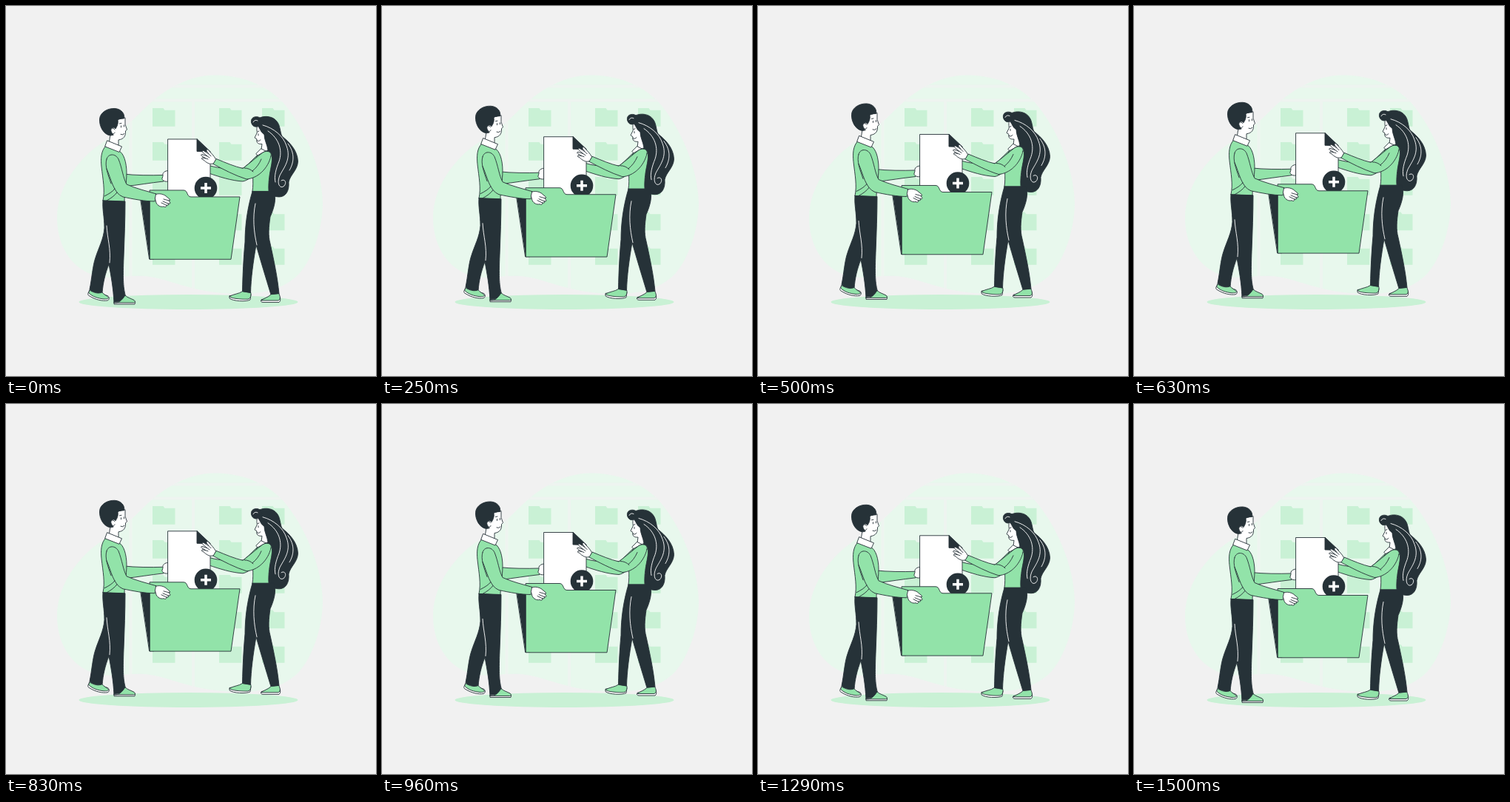
An HTML page that plays this animation: 500 by 500 pixels, repeating every 1.54 s.

```html
<!DOCTYPE html>
<html lang="en">
<head>
<meta charset="utf-8">
<title>Adding a file</title>
<style>
  html, body { margin: 0; width: 100%; height: 100%; overflow: hidden; background: #f1f1f1; }
  svg { display: block; width: 100%; height: 100%; }
  #team path { stroke: #263238; stroke-width: .9; stroke-linejoin: round; stroke-linecap: round; fill: none; }
  #team .green { fill: #92e3a9; }
  #team .dark { fill: #263238; }
  #team .white { fill: #fff; }
  #team .light { stroke: #fff; }
</style>
</head>
<body>
<svg viewBox="0 0 500 500">
  <defs>
    <path id="blob" d="M280 93.500C250 94 222 109 201 126C180 144 164 164 140 179C105 197 69 240 69 286C69 330 94 360 128 366C152 369 173 361 201 367C236 375 254 386 302 388.500C339 391 374 385 396 362C415 341 428 300 428 266C427 217 402 162 374 130C348 103 312 93 280 93.500Z"/>
    <clipPath id="inside"><use href="#blob"/></clipPath>
  </defs>

  <use href="#blob" fill="#e8f8ed"/>
  <g clip-path="url(#inside)">
    <path d="M215 108.500H360M190 127.500H385M168.500 130V375M253 129V395" fill="none" stroke="#eef4f0" stroke-width="4"/>
    <g id="shelf" fill="#c9f1d5"/>
  </g>
  <ellipse cx="246.500" cy="400" rx="148" ry="10" fill="#c9f1d5"/>

  <g id="team">
    <!-- far arms -->
    <path class="green" d="M158 227C175 229 195 229 213 228.500L213 237C195 239 178 242 160 244Z"/>
    <path class="white" d="M212 229C211 225 215 223 219 222.500V237C215 238 212 236 211 234Z"/>
    <path class="green" d="M276 216C290 220 306 221 321 219C329 213 336 204 343 199L340 222C333 231 326 236 320 237C304 236 289 231 274 226Z"/>

    <!-- folder and sheet -->
    <path class="dark" d="M182 261H200V342H194Z"/>
    <path class="white" d="M219 180H258L276 197V260H219Z"/>
    <path class="dark" d="M258 180V196.500L276 197Z"/>
    <circle cx="270" cy="246" r="15.300" fill="#263238"/>
    <path class="light" d="M263 246H277M270 239V253" style="stroke-width:3.500;stroke-linecap:butt"/>
    <path class="green" d="M194.500 249H240C246 249 244 258 250 258H316L304 342.300H194.500Z"/>

    <!-- man -->
    <path class="white" d="M142 168L139 186L152 192L152 181C159 180 162 176 161.500 169L163.500 167L161 160V151L147 154Z"/>
    <path class="dark" d="M141 175C132 174 126 163 126.500 153C127 144 137 138 147 138.500C156 139 161 146 159.500 152C155 152 152 153 151 154C152 159 150 163 148 166C146 163 142 164 142 168C142 171 144 173 145 174Z"/>
    <path class="white" d="M147 167C144 163 141 166 142 169C143 173 146 174 147 171"/>
    <path d="M153.500 159L156 158.500M155.500 162V164M155 173.500Q158 175 160 172.500M159.500 161V163"/>
    <path class="green" d="M135 189C128 196 128 207 129 217C131 235 134 249 131 263L160 264.500C160 255 163 238 163 226C163 211 159 199 153 196Z"/>
    <path class="white" d="M137 182L156.500 190L153 197.500L134 190Z"/>
    <path class="dark" d="M131 263L161 264C161 288 160 313 159 340C158 366 158 379 161.500 392C157 399 152 402 146 401C145 381 142 365 139 349C134 362 131 374 130 388C124 389 117 387 113 383C116 369 117 351 121 340C125 327 132 315 133 300C133 285 130 275 131 263Z"/>
    <path class="light" d="M136 297C137 315 142 328 140 347"/>
    <path class="white" d="M113 385C110 388 110 391 113 392C121 397 130 399 137 398C140 397 140 394 138 392Z"/>
    <path class="green" d="M113 384C119 388 125 389 130 387C132 390 136 391 138.500 394C139 396 135 396 132 396C124 395 117 393 112 388Z"/>
    <path class="white" d="M146 400V403H174Q176 400 173 398Z"/>
    <path class="green" d="M146 401C153 402 157 397 161 391C164 394 168 395 172 397C175 398 175 401 173 401Z"/>
    <path class="green" d="M136 207C138 199 148 199 152 207C157 219 158 232 163 241C176 247 190 250 203 254L201 264C188 264 172 261 158 258C145 253 142 233 136 220"/>
    <path d="M136 207C133 216 138 228 142 240M133 257C139 254 144 251 147 247M136 263C142 260 147 256 150 252"/>
    <path class="white" d="M202.500 254.500C207 253 211 254 215 256L221 261Q223 263 220 263L222 266Q222 268 219 267Q221 270 217 269Q217 273 213 271C209 272 205 270 203 266Q200 260 202.500 254.500Z"/>
    <path d="M213 261L220 263M212 264L219 267M210 266L217 269.500"/>

    <!-- woman -->
    <path class="dark" d="M340 163C333 165 330 157 332 153C334 149 340 149 343 151C350 148 361 149 366 156C371 162 370 170 373 176C383 184 394 195 394.500 210C394 222 384 228 382 238C383 250 378 258 369 258C358 258 353 250 355 241C358 226 354 208 351 197L343 166Z"/>
    <path class="white" d="M341 162C337 164 340 169 339 172L336 178L339 180C338 185 341 187 346 186.500L345 194L341 200L354 195C353 187 349 181 349 174C347 172 348 167 346 163Z"/>
    <path class="dark" d="M341 163C344 167 345 172 349 173C353 169 351 158 343 153C338 149 332 152 332 157C333 161 337 162 339 160Z"/>
    <path class="light" d="M334 157Q336 153 340 155M347 161C362 165 375 176 379 189C386 207 375 219 370 229C365 241 371 248 376 243C380 238 376 233 372 236M354 169C369 179 374 195 369 210C365 220 362 230 364 238M381 186C391 199 389 212 383 222"/>
    <path d="M340 170L342 169M341 173V175M339 182Q342 184 344 181"/>
    <path class="green" d="M341 200C350 195 359 196 359.500 204C360 217 354 227 355 250.500H333C335 237 332 226 335 211Z"/>
    <path class="white" d="M345 193L351 196L340 202L338 200Z"/>
    <path class="dark" d="M333 250.500H362C366 260 362 274 357 285C355 299 354 310 357 321C362 344 367 367 369 389L358 390C351 367 344 344 338 323C334 346 331 368 330.500 388L319.500 386C320 361 321 341 323 319C323 297 326 274 333 250.500Z"/>
    <path class="light" d="M337 267C333 286 335 306 339 323"/>
    <path class="white" d="M331 390L330 397C325 400 306 399 302 395V392Z"/>
    <path class="green" d="M319 386C315 389 308 389 302 392.500C302 395 320 397 328 396C331 394 331 391 331 388Z"/>
    <path class="white" d="M345 397Q343 400 347 400.500H369Q372 398 370 393Z"/>
    <path class="green" d="M358 390C354 394 348 395 345 398H368C372 396 370 392 369 389Z"/>
    <path class="green" d="M358 203C354 220 340 233 325 234C309 229 294 221 279 213L284 206.500C297 212 309 217 320 219.500C330 212 339 204 347 198C354 194 360 198 358 203Z"/>
    <path d="M322 219C327 219 331 221 334 224M345 207C342 214 338 219 333 223"/>
    <path class="white" d="M283.500 207C281 202 277 199 273 194Q270 193 271 196L274 200L267 195.500Q264 195 266 198L272 203L265 200.500Q262 201 265 203L270 206L265 205Q263 207 267 208C270 211 275 215 280 213Z"/>
    <path d="M274 200L277 203M272 203L275 205M270 206L273 207"/>
  </g>
</svg>
<script>
  const LOOP = 1540, RISE = 10, LEAD = 40;
  const team = document.getElementById('team');

  // Small folders standing on the shelves
  document.getElementById('shelf').innerHTML = [198, 288, 346].map(x =>
    [138, 184, 231, 278.500, 325].map(y =>
      `<path d="M${x} ${y}h14.500l2 2.800h14v22h-30.500z"/>`).join('')).join('');

  // Linear rise and fall, lowest point shortly before the loop ends
  function draw(now) {
    const phase = (now + LEAD) % LOOP / LOOP;
    const lift = RISE * (1 - Math.abs(1 - 2 * phase));
    team.setAttribute('transform', `translate(0 ${0.5 - lift})`);
  }

  const start = performance.now();
  function tick() {
    draw(performance.now() - start);
    requestAnimationFrame(tick);
  }
  tick();
</script>
</body>
</html>
```
